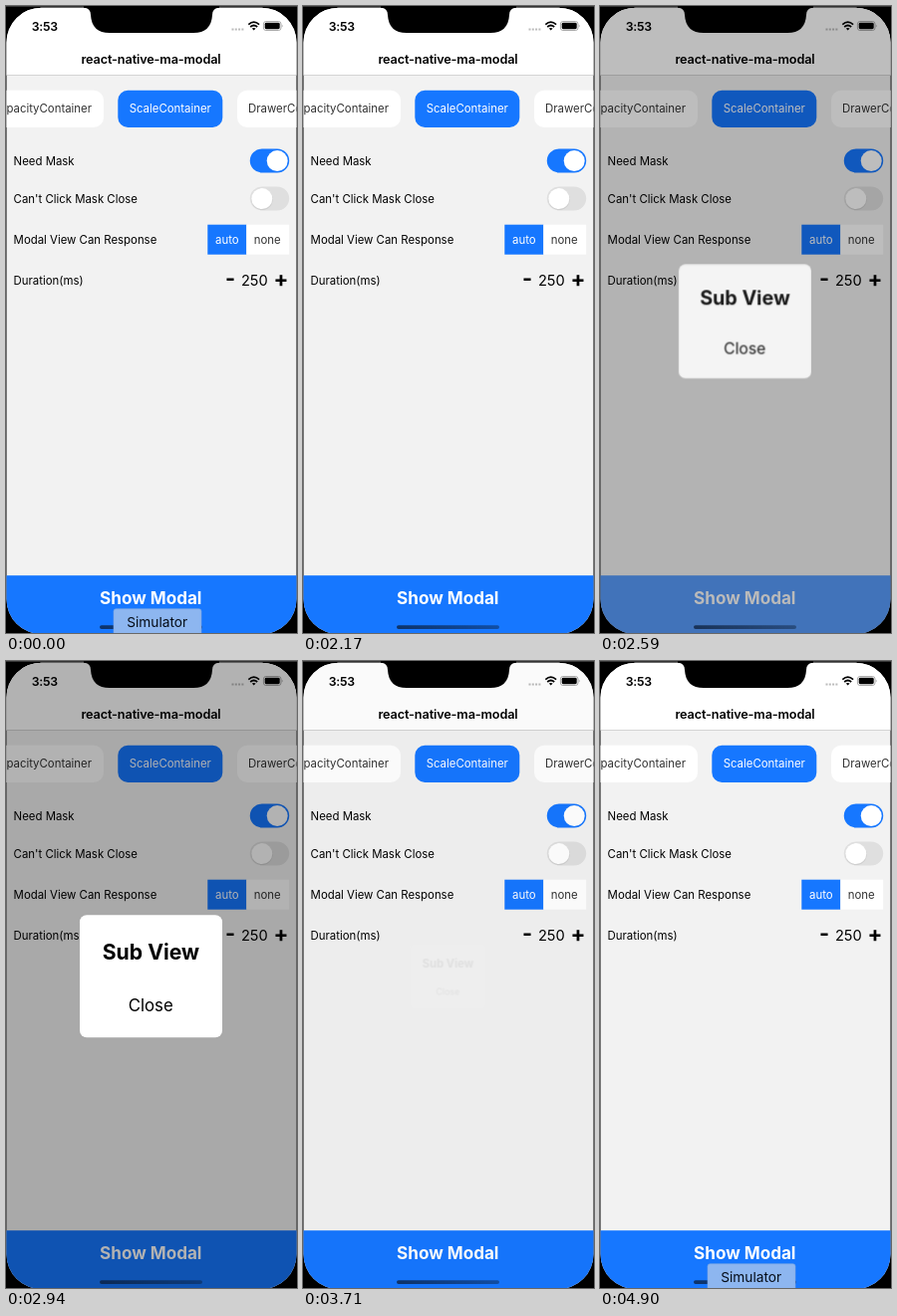
An HTML page that plays this animation: 292 by 630 pixels, repeating every 5.04 s.

```html
<!DOCTYPE html>
<html lang="en">
<head>
<meta charset="utf-8">
<title>Modal demo</title>
<style>
  @property --open { syntax: "<number>"; inherits: true; initial-value: 0; }

  html, body { margin: 0; width: 100%; height: 100%; overflow: hidden; background: #000; }
  svg { display: block; width: 292px; height: 630px; animation: open 5040ms step-end infinite; }
  text { font: 400 11.4px Inter, "Liberation Sans", sans-serif; fill: #000; white-space: pre; }
  .mid { text-anchor: middle; }
  .end { text-anchor: end; }
  .semi { font-weight: 600; }
  .bold { font-weight: 700; }
  .white { fill: #fff; }
  .grey { fill: #333; }
  .blue { fill: #1677ff; }

  .mask { opacity: calc(.3 * var(--open)); }
  .modal {
    opacity: var(--open);
    transform: scale(calc(.5 + .5 * var(--open)));
    transform-origin: 145.5px 316.7px;
  }
  .show { animation: show 5040ms step-end infinite; }
  .close { animation: close 5040ms step-end infinite; }
  .tip { animation: tip 5040ms step-end infinite; }

  @keyframes open {
    0% { --open: 0; }
    48.61% { --open: .08; }
    49.99% { --open: .41; }
    51.38% { --open: .86; }
    52.77% { --open: 1; }
    70.83% { --open: .8; }
    73.61% { --open: .06; }
    74.99%, 100% { --open: 0; }
  }
  @keyframes show {
    0% { opacity: 1; }
    44.44% { opacity: .85; }
    45.83% { opacity: .45; }
    47.22% { opacity: .2; }
    48.61% { opacity: .22; }
    49.99% { opacity: .39; }
    51.38% { opacity: .7; }
    52.77% { opacity: .95; }
    54.16%, 100% { opacity: 1; }
  }
  @keyframes close {
    0% { opacity: 1; }
    68.05% { opacity: .5; }
    70.83%, 100% { opacity: 1; }
  }
  @keyframes tip {
    0% { opacity: 1; }
    1.38% { opacity: .88; }
    2.77% { opacity: .72; }
    4.16% { opacity: .55; }
    5.55% { opacity: .38; }
    6.94% { opacity: .22; }
    8.33% { opacity: .09; }
    9.72% { opacity: 0; }
    93.05% { opacity: .3; }
    94.44% { opacity: .6; }
    95.83% { opacity: .85; }
    97.22%, 100% { opacity: 1; }
  }
</style>
</head>
<body>
<svg viewBox="0 0 292 630">
  <defs>
    <clipPath id="screen"><rect x=".5" y="1.7" width="291" height="629.3" rx="35"/></clipPath>
    <linearGradient id="bar">
      <stop stop-color="#0b1c36" stop-opacity=".75"/>
      <stop offset="1" stop-color="#0b1c36" stop-opacity=".45"/>
    </linearGradient>
  </defs>
  <path d="M0 .5H292" stroke="#333"/>

  <g clip-path="url(#screen)">
    <rect width="292" height="630" fill="#f2f2f2"/>

    <!-- status bar and header -->
    <rect width="292" height="69" fill="#fff"/>
    <path d="M0 69.5H292" stroke="#d4d4d4"/>
    <text class="semi" x="25.8" y="24.7" style="font-size:12.3px;letter-spacing:-.3px">3:53</text>
    <path d="M226.5 23.5H238.5" stroke="#bbb" stroke-width="2" stroke-dasharray="2 1.3"/>
    <path d="M243.3 18.6Q248.7 13.8 254.1 18.6M245.2 21Q248.7 18 252.2 21" fill="none" stroke="#000" stroke-width="1.7"/>
    <path d="M246.8 22.6Q248.7 21.2 250.6 22.6L248.7 24.6Z"/>
    <rect x="258.4" y="15.5" width="17.6" height="9" rx="2.5" fill="none" stroke="#999" stroke-width=".8"/>
    <rect x="259.7" y="16.8" width="15" height="6.4" rx="1.4"/>
    <path d="M276.9 18.5Q278.3 20 276.9 21.5Z" fill="#888"/>
    <text class="mid semi" x="145.5" y="58" style="font-size:12.7px;letter-spacing:-.14px">react-native-ma-modal</text>

    <!-- container tabs -->
    <rect class="white" x="-22" y="84.7" width="120" height="37.2" rx="10"/>
    <rect class="blue" x="112.3" y="84.7" width="105" height="37.2" rx="10"/>
    <rect class="white" x="232" y="84.7" width="120" height="37.2" rx="10"/>
    <text class="end grey" x="86" y="107.3">OpacityContainer</text>
    <text class="mid white" x="164.8" y="107.3">ScaleContainer</text>
    <text class="grey" x="243" y="107.3">DrawerContainer</text>

    <!-- settings -->
    <text x="7.6" y="159.8">Need Mask</text>
    <text x="7.6" y="197.8">Can't Click Mask Close</text>
    <text x="7.6" y="238.8">Modal View Can Response</text>
    <text x="7.6" y="279.8">Duration(ms)</text>

    <rect class="blue" x="244.8" y="143.6" width="39.4" height="24" rx="12"/>
    <circle class="white" cx="272.2" cy="155.6" r="10.5"/>
    <rect x="244.8" y="181.6" width="39.4" height="24" rx="12" fill="#dfdfdf"/>
    <circle cx="257" cy="194.4" r="10.7" fill="#cfcfcf"/>
    <circle class="white" cx="256.8" cy="193.6" r="10.5"/>

    <rect class="blue" x="202.3" y="219.7" width="39" height="30"/>
    <rect class="white" x="241.3" y="219.7" width="42.9" height="30"/>
    <text class="mid white" x="221.8" y="238.8">auto</text>
    <text class="mid grey" x="262.2" y="238.8">none</text>

    <text class="mid bold" x="225" y="281.3" style="font-size:21.5px">-</text>
    <text class="mid" x="249.3" y="280.8" style="font-size:14.6px">250</text>
    <text class="mid bold" x="276" y="282.4" style="font-size:22px">+</text>

    <g class="show">
      <rect class="blue" y="572.2" width="292" height="59"/>
      <text class="mid bold white" x="145.3" y="600.8" style="font-size:17.1px">Show Modal</text>
    </g>

    <rect class="mask" width="292" height="630"/>
    <g class="modal">
      <rect class="white" x="74" y="255.3" width="143" height="123" rx="7"/>
      <text class="mid bold" x="145.4" y="299.5" style="font-size:21.2px">Sub View</text>
      <text class="mid close" x="145.2" y="352" style="font-size:16.8px">Close</text>
    </g>
    <rect x="94" y="622.2" width="103" height="3.8" rx="1.9" fill="url(#bar)"/>
  </g>

  <path d="M78 0V1.7Q85 2 85 9Q86 27 104 27H188Q206 27 207 9Q207 2 214 1.7V0Z"/>

  <g class="tip">
    <rect x="108" y="605.7" width="88" height="30" rx="2.5" fill="#8db6f0" stroke="#7fa7e0" stroke-width=".6"/>
    <text class="mid" x="151.7" y="623.6" style="font-size:13.7px;fill:#060d18">Simulator</text>
  </g>
</svg>
</body>
</html>
```
